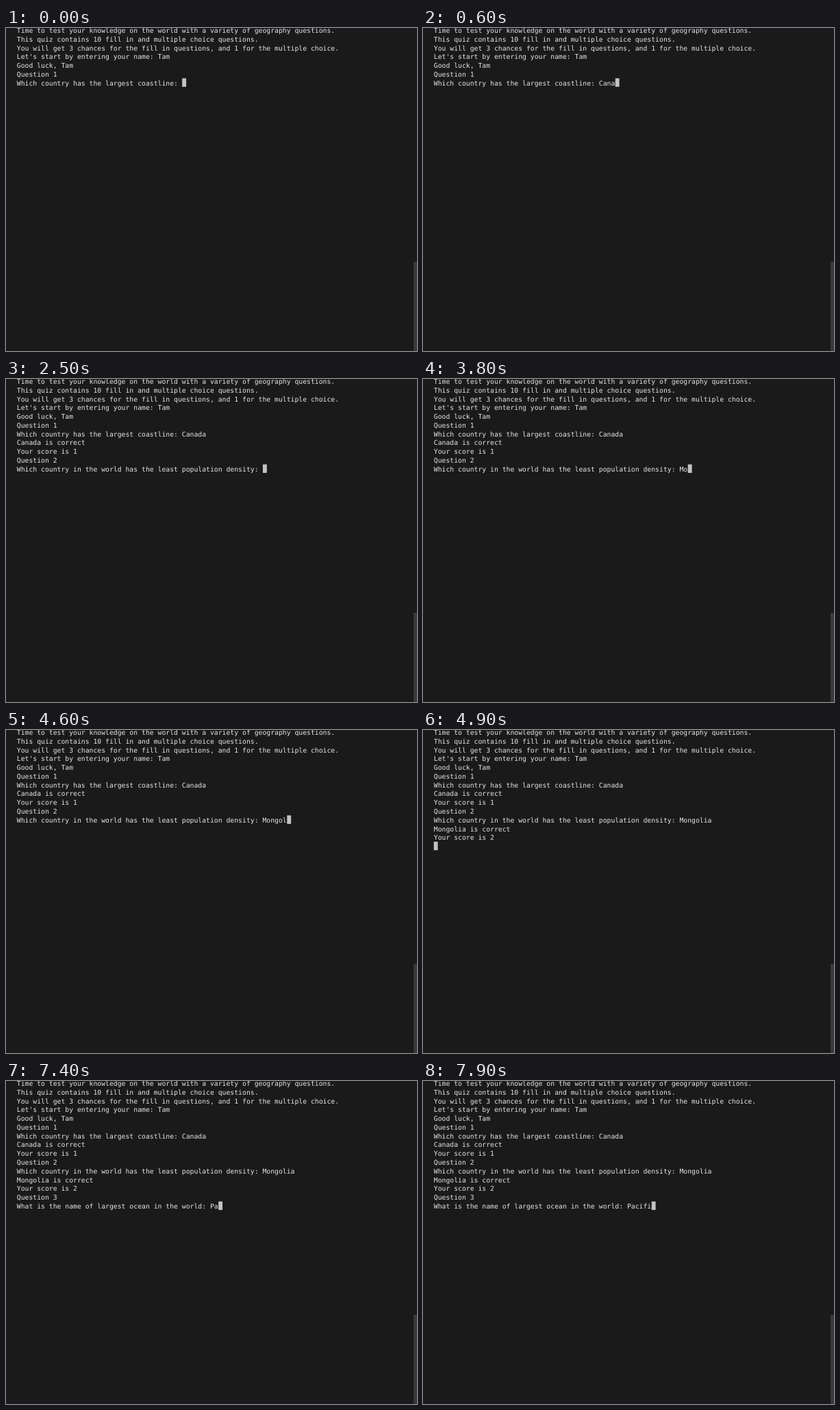
Animation of 600x471 px, one loop 8000 ms. Source, as an HTML page:

```html
<!DOCTYPE html>
<html lang="en">
<head>
<meta charset="utf-8">
<title>Geography quiz</title>
<style>
  html, body { margin: 0; height: 100%; overflow: hidden; background: #1b1a1b; }
  svg { display: block; width: 600px; height: 471px; }
  text {
    font: 9.78px "DejaVu Sans Mono", monospace;
    font-variant-ligatures: none;
    text-rendering: geometricPrecision;
    white-space: pre;
    fill: #e6e5e6;
  }
</style>
</head>
<body>
<svg viewBox="0 0 600 471">
  <rect x="595" y="341" width="5" height="130" fill="#3b3a3b"/>
  <g id="lines"></g>
  <rect id="cursor" width="5.9" height="12.4" fill="#c4c3c4"/>
</svg>
<script>
const LOOP = 8000, LEFT = 15.75, TOP = -3.4, CHAR = 5.888, LINE = 12.79, BASELINE = 10.35;

const intro = `Time to test your knowledge on the world with a variety of geography questions.
This quiz contains 10 fill in and multiple choice questions.
You will get 3 chances for the fill in questions, and 1 for the multiple choice.
Let's start by entering your name: Tam
Good luck, Tam
`;

// Each event appends text to the terminal at a given time.
const events = [];
const print = (time, text) => events.push({ time, text });
const type = (word, times) => times.forEach((time, i) => print(time, word[i]));

print(0, intro + "Question 1\nWhich country has the largest coastline: ");
type("Canada", [200, 400, 500, 600, 700, 900]);
print(1000, "\nCanada is correct\nYour score is 1\n");
print(2500, "Question 2\nWhich country in the world has the least population density: ");
type("Mongolia", [3600, 3800, 3900, 4000, 4400, 4600, 4700, 4800]);
print(4900, "\nMongolia is correct\nYour score is 2\n");
print(6400, "Question 3\nWhat is the name of largest ocean in the world: ");
type("Pacifi", [7200, 7400, 7600, 7700, 7800, 7900]);

const group = document.getElementById("lines");
const cursor = document.getElementById("cursor");
const rows = Array.from({ length: 15 }, (_, i) => {
  const row = document.createElementNS("http://www.w3.org/2000/svg", "text");
  row.setAttribute("x", LEFT);
  row.setAttribute("y", Math.round(TOP + i * LINE + BASELINE));
  return group.appendChild(row);
});

let shown = "";
function draw() {
  const time = performance.now() % LOOP;
  const output = events.filter(e => e.time <= time).map(e => e.text).join("");
  if (output !== shown) {
    shown = output;
    const lines = output.split("\n");
    const last = lines.length - 1;
    rows.forEach((row, i) => row.textContent = lines[i] || "");
    cursor.setAttribute("x", LEFT + lines[last].length * CHAR);
    cursor.setAttribute("y", TOP + last * LINE);
  }
  requestAnimationFrame(draw);
}
draw();
</script>
</body>
</html>
```
